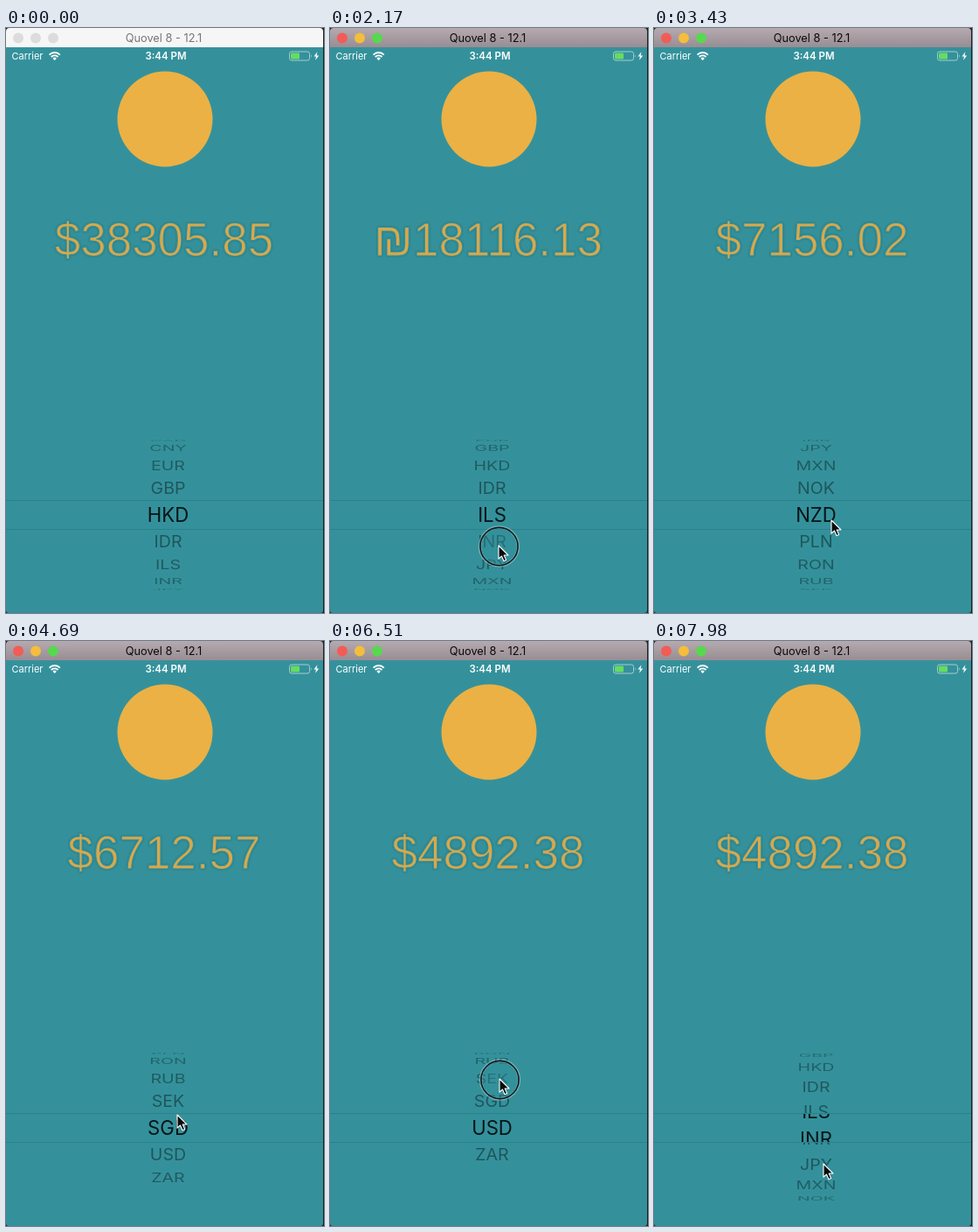
An HTML page that plays this animation: 364 px wide and 668 px high, repeating every 8 s.

```html
<!DOCTYPE html>
<html lang="en">
<head>
<meta charset="utf-8">
<title>Currency picker</title>
<style>
  html, body { margin: 0; width: 100%; height: 100%; overflow: hidden; background: #34919b; }
  svg { display: block; width: 100%; height: 100%; }
  text { font-family: Inter, "Open Sans", sans-serif; text-anchor: middle; }
  /* The background-coloured outline thins the glyphs to a light weight. */
  #price {
    font: 53px "Liberation Sans", sans-serif;
    fill: #d9a84b; stroke: #34919b; stroke-width: 1.2px;
    filter: drop-shadow(0 .5px .8px rgba(0, 30, 30, .3));
  }
  .inactive { --bar: #f6f6f6; --title: #777; --red: #dcdcdc; --yellow: #dcdcdc; --green: #dcdcdc; }
  .active { --bar: url(#barFill); --title: #0c0a0b; --red: #f25c56; --yellow: #f4bd3c; --green: #58d84e; }
</style>
</head>
<body>
<svg viewBox="0 0 364 668" preserveAspectRatio="none">
  <defs>
    <linearGradient id="barFill" x2="0" y2="1">
      <stop stop-color="#b5aab0"/><stop offset="1" stop-color="#988d93"/>
    </linearGradient>
    <clipPath id="bandClip"><rect y="539.5" width="364" height="33"/></clipPath>
    <clipPath id="wheelClip"><path d="M0 468H364V539.5H0ZM0 572.5H364V643H0Z"/></clipPath>
  </defs>

  <rect width="364" height="668" fill="#1c1f20"/>
  <path d="M0 22H363V665Q363 668 360 668H3Q0 668 0 665Z" fill="#34919b"/>

  <g id="bar" class="inactive">
    <path d="M0 22V4Q0 0 4 0H359Q363 0 363 4V22Z" style="fill:var(--bar)"/>
    <circle cx="14" cy="11.5" r="6" style="fill:var(--red)"/>
    <circle cx="34" cy="11.5" r="6" style="fill:var(--yellow)"/>
    <circle cx="54" cy="11.5" r="6" style="fill:var(--green)"/>
    <text x="180.5" y="16" font-size="12.8" style="fill:var(--title)">Quovel 8 - 12.1</text>
  </g>

  <g fill="#fff">
    <text x="24.5" y="36" font-size="11">Carrier</text>
    <text x="183" y="36" font-size="11.5" font-weight="600">3:44 PM</text>
    <g fill="none" stroke="#fff" stroke-width="1.9">
      <path d="M49.6 30.6a8.6 8.6 0 0 1 12.2 0M51.8 33a5.4 5.4 0 0 1 7.8 0"/>
    </g>
    <path d="M55.7 37l-2.2-2.3a3.1 3.1 0 0 1 4.4 0Z"/>
    <rect x="324.5" y="27" width="23" height="10" rx="2.4" fill="none" stroke="#a5cdd1"/>
    <path d="M349 30.2q1.8 1.8 0 3.6Z" fill="#a5cdd1"/>
    <rect x="326" y="28.5" width="10" height="7" rx="1" fill="#65dc63"/>
    <path d="M356.4 27.2l-4 5.2h2.6l-1 4.4 4.2-5.4h-2.7Z"/>
  </g>

  <circle cx="182" cy="104" r="54.5" fill="#ebb144"/>
  <text id="price" x="181" y="260.3"></text>

  <g id="wheel" clip-path="url(#wheelClip)"></g>
  <g id="band" clip-path="url(#bandClip)"></g>
  <path d="M0 539.5H363M0 572.5H363" stroke="#2c808a"/>

  <g id="pointer">
    <g id="press" fill="none">
      <circle r="22" cx=".5" cy="1" fill="#34919b" fill-opacity=".4" stroke="#fff" stroke-opacity=".3" stroke-width="3.4"/>
      <circle r="21.6" cx=".5" cy="1" stroke="#10191a" stroke-width="1.6"/>
    </g>
    <path d="M0 0V15.2L3.5 12 6 17.8 8.7 16.6 6.2 11H11Z" fill="#0b0b0b" stroke="#fff" stroke-width="1.1" stroke-linejoin="round"/>
  </g>
</svg>
<script>
const LOOP = 8000, TICK = 70;
const CENTER = 556, RADIUS = 85.4, STEP = 0.364;
const CODES = ("AUD BRL CAD CNY EUR GBP HKD IDR ILS INR JPY " +
  "MXN NOK NZD PLN RON RUB SEK SGD USD ZAR").split(" ");

const ease = {
  lin: u => u,
  in: u => u * u,
  out: u => 1 - (1 - u) ** 2,
  both: u => u * u * (3 - 2 * u)
};

// Each step: time, values..., easing used to arrive there.
const scroll = [
  [0, 6], [420, 6], [980, 8.07, "both"], [1190, 8, "out"],
  [2170, 8], [2520, 9.7, "in"], [3220, 13, "out"],
  [3570, 13], [3780, 14.5, "in"], [4230, 18, "out"],
  [5320, 18], [5600, 19.05, "both"], [5740, 19, "out"],
  [6510, 19], [6860, 15.9, "in"], [8400, 8.02, "out"]
];
const path = [
  [0, 186, 668], [350, 193, 597, "out"], [420, 193, 597],
  [980, 193, 534, "both"], [1260, 193, 534], [1960, 193, 591, "both"],
  [2170, 193, 591], [2520, 195, 540, "in"], [2940, 200, 540],
  [3360, 203, 562, "both"], [3430, 203, 562], [3570, 197, 592, "both"],
  [3780, 196, 541, "in"], [5040, 196, 541], [5250, 194, 586, "both"],
  [5320, 194, 586], [5600, 194, 553, "both"], [5810, 194, 553],
  [6370, 194, 500, "both"], [6510, 194, 500], [6860, 194, 597, "in"], [8000, 194, 597]
];
const presses = [[420, 1050], [2100, 2520], [3570, 3780], [5250, 5670], [6440, 6860]];
const prices = [[0, "$38305.85"], [1540, "₪18116.13"], [3290, "$7156.02"],
  [4480, "$6712.57"], [6090, "$4892.38"]];

const $ = id => document.getElementById(id);

function track(steps, t) {
  const i = steps.findIndex(s => s[0] > t);
  if (i < 0) return steps.at(-1).slice(1);
  const a = steps[i - 1], b = steps[i];
  const last = b.at(-1);
  const u = ease[typeof last === "string" ? last : "lin"]((t - a[0]) / (b[0] - a[0]));
  const size = steps[0].length;
  return a.slice(1, size).map((v, k) => v + (b[k + 1] - v) * u);
}

function addLabel(parent, code, size) {
  const label = document.createElementNS("http://www.w3.org/2000/svg", "text");
  label.textContent = code;
  label.setAttribute("font-size", size);
  label.setAttribute("y", size * 0.364);
  $(parent).append(label);
  return label;
}

const rows = CODES.map(code => ({
  outer: addLabel("wheel", code, 19.6),
  inner: addLabel("band", code, 22.2)
}));

function placeRows(position) {
  rows.forEach(({ outer, inner }, i) => {
    const angle = (i - position) * STEP;
    const depth = Math.cos(angle);
    const visible = Math.abs(angle) < Math.PI / 2;
    const y = CENTER + RADIUS * Math.sin(angle);
    for (const label of [outer, inner]) {
      label.style.display = visible ? "" : "none";
      label.setAttribute("transform", `translate(185.5 ${y}) scale(1 ${depth})`);
    }
    outer.setAttribute("opacity", visible ? 0.42 * (0.2 + 0.8 * Math.sqrt(depth)) : 0);
    inner.setAttribute("opacity", 0.85);
  });
}

function draw(t) {
  $("bar").setAttribute("class", t < 350 ? "inactive" : "active");
  $("price").textContent = prices.findLast(p => p[0] <= t)[1];
  placeRows(track(scroll, t)[0]);
  const [x, y] = track(path, t);
  $("pointer").setAttribute("transform", `translate(${x} ${y})`);
  $("pointer").style.display = t < TICK ? "none" : "";
  $("press").style.display = presses.some(([from, to]) => t >= from && t < to) ? "" : "none";
}

const start = performance.now();
function frame() {
  const t = (performance.now() - start) % LOOP;
  draw(Math.floor(t / TICK) * TICK);
  requestAnimationFrame(frame);
}
frame();
</script>
</body>
</html>
```
